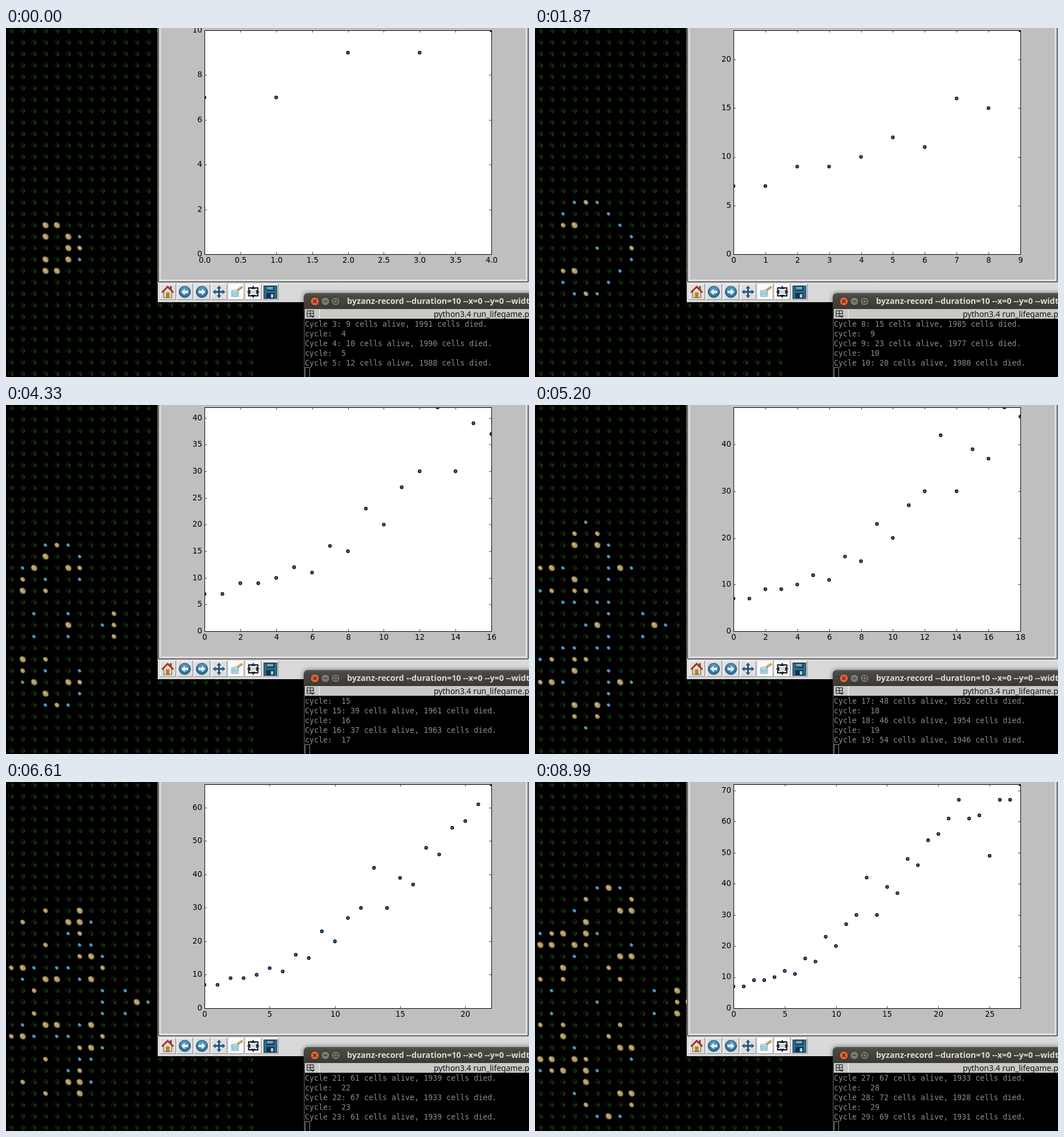
An HTML page with a canvas that plays this animation: 917 by 611 pixels, repeating every 9080 ms.

```html
<!DOCTYPE html>
<html>
<head>
<meta charset="utf-8">
<title>Game of life with population plot</title>
<style>
html, body { margin: 0; width: 100%; height: 100%; overflow: hidden; background: #000; }
canvas { display: block; }
</style>
</head>
<body>
<canvas id="stage" width="917" height="611"></canvas>
<script>
const ctx = document.getElementById('stage').getContext('2d');
const LOOP = 9080, FIRST_GEN = 5, SIZE = 90, OFFSET = 35, TOTAL = 2000;

// Moments at which a new generation appears; its point is plotted a little later.
const BIRTHS = [65, 350, 740, 1140, 1590, 1870, 2640, 2730, 2970, 3380, 4040, 4230, 4630,
  4870, 5200, 5590, 5940, 6370, 6610, 7010, 7100, 7400, 7500, 8550, 8990];
const PLOT_DELAY = 95;
const genAt = time => FIRST_GEN - 1 + BIRTHS.filter(b => b <= time).length;

// ---- life: each entry holds a cell's age in generations, 0 when dead ----
const at = (col, row) => (row + OFFSET) * SIZE + col + OFFSET;

function nextGeneration(cells) {
  const next = new Uint8Array(cells.length);
  for (let i = SIZE + 1; i < cells.length - SIZE - 1; i++) {
    let near = 0;
    for (const d of [-SIZE, 0, SIZE])
      for (let k = -1; k <= 1; k++) if ((d || k) && cells[i + d + k]) near++;
    if (near === 3 || (near === 2 && cells[i])) next[i] = cells[i] + 1;
  }
  return next;
}

// The start is a pi-heptomino: three sides of a 3 by 3 square, open to the left.
const seed = new Uint8Array(SIZE * SIZE);
for (let col = 2; col <= 4; col++) seed[at(col, 18)] = seed[at(col, 20)] = 1;
seed[at(4, 19)] = 1;
const history = [seed];
while (history.length < FIRST_GEN + BIRTHS.length) history.push(nextGeneration(history.at(-1)));
const alive = history.map(cells => cells.reduce((n, age) => n + (age > 0), 0));

// ---- drawing helpers ----
function rect(color, x, y, w, h) {
  ctx.fillStyle = color;
  ctx.fillRect(x, y, w, h);
}

function box(color, width, x, y, w, h) {
  ctx.strokeStyle = color;
  ctx.lineWidth = width;
  ctx.strokeRect(x, y, w, h);
}

function circle(x, y, r, fill, stroke, width = 1, from = 0, to = 7) {
  ctx.beginPath();
  ctx.arc(x, y, r, from, to);
  if (fill) { ctx.fillStyle = fill; ctx.fill(); }
  if (stroke) { ctx.strokeStyle = stroke; ctx.lineWidth = width; ctx.stroke(); }
}

// An ellipse leaning from top left to bottom right.
function leaning(x, y, long, short, fill) {
  ctx.beginPath();
  ctx.ellipse(x, y, long, short, Math.PI / 4, 0, 7);
  ctx.fillStyle = fill;
  ctx.fill();
}

function line(color, width, ...points) {
  ctx.beginPath();
  for (let i = 0; i < points.length; i += 2) ctx.lineTo(points[i], points[i + 1]);
  ctx.strokeStyle = color;
  ctx.lineWidth = width;
  ctx.stroke();
}

function arrow(color, tip, head, half, shaft) {
  ctx.beginPath();
  ctx.moveTo(tip, 0);
  ctx.lineTo(head, -half);
  ctx.lineTo(head, half);
  ctx.fillStyle = color;
  ctx.fill();
  if (shaft) rect(color, Math.min(0, -head), -shaft, head + Math.abs(head), 2 * shaft);
}

function text(string, x, y, font, color, align = 'left') {
  ctx.font = font;
  ctx.fillStyle = color;
  ctx.textAlign = align;
  ctx.fillText(string, x, y);
}

// ---- cells ----
function drawDead(x, y) {
  circle(x, y, 3.8, null, '#1d3213', 1, 2.6, 5.9);
  circle(x, y, 3.7, null, '#2f6a20', 1.1, -0.5, 1.5);
  line('#3f7f28', 1.2, x - 0.5, y + 1.5, x + 1.5, y - 1);
}

function drawGrown(x, y, r) {
  const halo = ctx.createRadialGradient(x, y, 0, x, y, r);
  halo.addColorStop(0.5, '#7d6d43');
  halo.addColorStop(1, 'rgba(50,42,24,0)');
  circle(x, y, r, halo);
  leaning(x, y, r * 0.8, r * 0.58, '#ab9760');
  leaning(x - r * 0.15, y - r * 0.1, r * 0.45, r * 0.28, '#c2ae74');
}

function drawCells(cells) {
  for (let row = 0; row < 31; row++)
    for (let col = 0; col < 22; col++) {
      const x = 9 + 20 * col, y = 5 + 20 * row, age = cells[at(col, row)];
      if (age === 0) drawDead(x, y);
      else if (age === 1) leaning(x, y + 0.3, 3.2, 2.6, '#4796bb');
      else drawGrown(x + 0.3, y + 0.3, age === 2 ? 5.4 : 7.2);
    }
}

// ---- plot ----
const AXES = { left: 348, top: 4, width: 503, height: 392 };
const LABEL = '13.33px "DejaVu Sans", sans-serif';

function eachTick(max, draw) {
  const raw = max / 9, power = 10 ** Math.floor(Math.log10(raw));
  const step = [1, 2, 5, 10].map(k => k * power).find(s => s >= raw - 1e-9);
  for (let i = 0; i * step <= max + 1e-9; i++)
    draw(i * step, (i * step).toFixed(step < 1 ? 1 : 0));
}

function drawPlot(last) {
  const { left, top, width, height } = AXES, right = left + width, bottom = top + height;
  const max = Math.max(...alive.slice(0, last + 1));
  const px = v => left + v / last * width, py = v => bottom - v / max * height;

  rect('#fff', left, top, width, height);
  ctx.save();
  ctx.beginPath();
  ctx.rect(left, top, width + 1, height + 1);
  ctx.clip();
  for (let i = 0; i <= last; i++) circle(px(i), py(alive[i]), 2.6, '#2f639f', '#000', 1.1);
  ctx.restore();

  eachTick(last, (v, label) => {
    const x = Math.round(px(v)) + 0.5;
    line('#000', 0.7, x, bottom, x, bottom - 4);
    line('#000', 0.7, x, top, x, top + 4);
    text(label, x, 411, LABEL, '#000', 'center');
  });
  eachTick(max, (v, label) => {
    const y = Math.round(py(v)) + 0.5;
    line('#000', 0.7, left, y, left + 4, y);
    line('#000', 0.7, right, y, right - 4, y);
    text(label, 344, Math.round(py(v) + 3.9), LABEL, '#000', 'right');
  });
  box('#000', 1, left + 0.5, top + 0.5, width, height);
}

// ---- toolbar, icons drawn around their own centre ----
function fourWays(draw) {
  for (let i = 0; i < 4; i++) {
    draw();
    ctx.rotate(Math.PI / 2);
  }
}

const roundArrow = dir => () => {
  circle(0, 0, 10, '#2f7299', '#1f4f6e');
  circle(0, -2, 7.5, '#4f93b8');
  ctx.scale(dir, 1);
  arrow('#e4f0f5', 6, 0, 6);
  rect('#e4f0f5', -6, -2.2, 7, 4.4);
};

const ICONS = [
  function home() {
    rect('#8c2f22', 4, -10, 3, 6);
    rect('#e6d8b0', -7, -1, 14, 11);
    rect('#a8803c', -3, 1, 6, 9);
    line('#6b5830', 1, -7, 0, -7, 10, 7, 10, 7, 0);
    line('#a52d22', 3, -10, 1, 0, -9, 10, 1);
  },
  roundArrow(-1),
  roundArrow(1),
  function pan() {
    fourWays(() => arrow('#1f567f', 11, 6, 4, 1.4));
  },
  function zoom() {
    rect('#fafafa', -13, -13, 26, 26);
    rect('#a9d3e0', -9, -3, 14, 12);
    circle(-2, 2, 5.5, '#c3e4ee', '#77aabb');
    for (const y of [1, 4]) line('#5f9db3', 1, -6, y, 2, y);
    line('#b98d45', 4, 2, -3, 11, -9);
    line('#e2c27c', 1.5, 2, -4, 10, -9.5);
  },
  function layout() {
    rect('#fafafa', -13, -13, 26, 26);
    box('#111', 2, -8, -7, 16, 14);
    rect('#c9d6da', -4, -3, 8, 6);
    fourWays(() => arrow('#1c2b33', 11, 5, 4));
  },
  function save() {
    rect('#12344c', -12, -11, 24, 23);
    rect('#2c6a91', -11, -10, 22, 21);
    rect('#12344c', -7, -11, 14, 9);
    rect('#6ea0bb', -6, -9, 11, 5);
    rect('#12344c', -7, 2, 14, 9);
    rect('#c8d5dc', 1, 4, 4, 6);
  }
];

function drawFigureWindow(last) {
  rect('#d9d9d9', 266, 0, 651, 480);
  rect('#bfbfbf', 272, 0, 639, 440);
  line('#000', 1, 267.5, 0, 267.5, 444.5, 915.5, 444.5, 915.5, 0);
  drawPlot(last);
  ICONS.forEach((icon, i) => {
    const x = 284 + 30 * i;
    rect('#8f8f8f', x - 14, 448, 28, 28);
    rect('#fff', x - 14, 448, 27, 27);
    rect('#dedede', x - 13, 449, 26, 26);
    ctx.save();
    ctx.translate(x - 0.5, 462);
    icon();
    ctx.restore();
  });
}

// ---- terminal ----
function logLine(i) {
  const n = i >> 1;
  return i % 2 ? `Cycle ${n}: ${alive[n]} cells alive, ${TOTAL - alive[n]} cells died.` : `cycle:  ${n}`;
}

function drawTerminal(lastLine) {
  const bar = ctx.createLinearGradient(0, 464, 0, 492);
  bar.addColorStop(0, '#5a5852');
  bar.addColorStop(0.15, '#4a4943');
  bar.addColorStop(1, '#3a3934');
  ctx.save();
  ctx.shadowColor = 'rgba(0,0,0,.5)';
  ctx.shadowBlur = 8;
  ctx.beginPath();
  ctx.roundRect(522, 464, 420, 170, 7);
  ctx.fillStyle = bar;
  ctx.fill();
  ctx.restore();

  circle(541.5, 478.5, 7.5, '#e0653a', '#2b2a26');
  for (const d of [-3, 3]) line('#4b2416', 1.4, 541.5 - d, 475.5, 541.5 + d, 481.5);
  for (const x of [560, 578]) circle(x, 478.5, 7.3, '#7b7971', '#2b2a26');
  line('#34332e', 1.4, 557, 478.5, 563, 478.5);
  box('#34332e', 1.4, 575, 475.5, 6, 6);
  text('byzanz-record --duration=10 --x=0 --y=0 --width=', 598, 483,
    'bold 14.35px "Noto Sans", sans-serif', '#dfdbd2');

  rect('#c9c8c7', 524, 492, 393, 17);
  box('#222', 1.2, 528, 495, 11, 10);
  line('#222', 1.2, 533.5, 495, 533.5, 505);
  line('#222', 1.2, 528, 500, 539, 500);
  rect('#c9c8c7', 535, 502, 6, 5);
  line('#222', 2, 535, 503.5, 537.7, 506, 540.5, 503.5);
  line('#f2f2f2', 1, 549.5, 492, 549.5, 509);
  text('python3.4 run_lifegame.py', 750, 506, '13.9px "Noto Sans", sans-serif', '#111');

  rect('#000', 524, 509, 393, 102);
  for (let k = 0; k < 5; k++)
    text(logLine(lastLine - 4 + k), 524, 523 + 17 * k, '13.3px "DejaVu Sans Mono", monospace', '#8a8c84');
  box('#8a8c84', 1, 524.5, 594.5, 8, 18);
}

function render(time) {
  const gen = Math.max(FIRST_GEN, genAt(time));
  const plotted = Math.max(FIRST_GEN - 1, genAt(time - PLOT_DELAY));
  rect('#000', 0, 0, 917, 611);
  drawCells(history[gen]);
  drawFigureWindow(plotted);
  drawTerminal(2 * gen + (plotted === gen ? 2 : 1));
}

const start = performance.now();
function loop() {
  render((performance.now() - start) % LOOP);
  requestAnimationFrame(loop);
}
loop();
</script>
</body>
</html>
```
